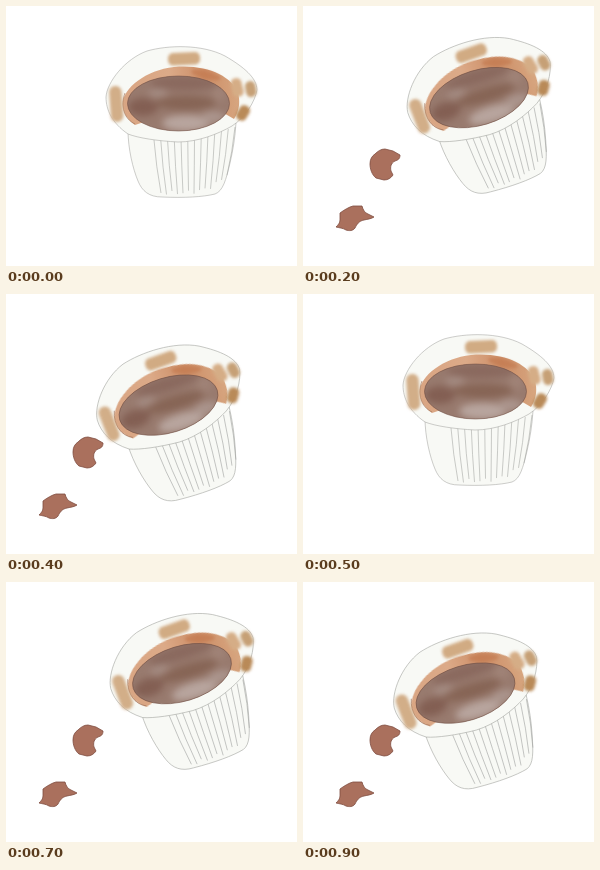
Animation of 291x260 px, one loop 1000 ms. Source, as an HTML page:

```html
<!DOCTYPE html>
<html lang="en">
<head>
<meta charset="utf-8">
<title>Coffee cup</title>
<style>
  html, body { margin: 0; width: 100%; height: 100%; overflow: hidden; background: #fff; }
  svg { display: block; width: 100vw; height: 100vh; }
  .upright, .tilted, .lifted, .crumbs { animation: 500ms step-end infinite; }
  .upright { animation-name: upright; }
  .tilted { animation-name: tilted; }
  .lifted { animation-name: lifted; }
  .crumbs { animation-name: spill; }
  @keyframes upright {
    0%, 60% { visibility: visible; }
    20%, 80%, 100% { visibility: hidden; }
  }
  @keyframes tilted {
    0%, 40%, 60% { visibility: hidden; }
    20%, 80%, 100% { visibility: visible; }
  }
  @keyframes lifted {
    0%, 60%, 100% { visibility: hidden; }
    40% { visibility: visible; }
  }
  @keyframes spill {
    0% { visibility: hidden; }
    40%, 100% { visibility: visible; }
  }
  .paper { fill: #f8f9f5; stroke: #a3a4a0; stroke-width: .55; }
  .ribs { fill: none; stroke: #a0a19f; stroke-width: .55; }
  .crumbs path { fill: #aa705d; stroke: #7f4d40; stroke-width: .8; stroke-linejoin: round; }
  filter { color-interpolation-filters: sRGB; }
</style>
</head>
<body>
<svg viewBox="0 0 291 260" preserveAspectRatio="none">
  <defs>
    <filter id="soft" x="-30%" y="-30%" width="160%" height="160%"><feGaussianBlur stdDeviation="1.4"/></filter>
    <filter id="edge" x="-10%" y="-10%" width="120%" height="120%"><feGaussianBlur stdDeviation=".7"/></filter>
    <filter id="cloud" x="-60%" y="-60%" width="220%" height="220%"><feGaussianBlur stdDeviation="3.5"/></filter>
    <linearGradient id="ring" x1="0" x2="1">
      <stop offset="0" stop-color="#d9a583"/>
      <stop offset=".4" stop-color="#dcaa88"/>
      <stop offset=".7" stop-color="#cc8d66"/>
      <stop offset="1" stop-color="#d7a680"/>
    </linearGradient>
    <clipPath id="pool"><ellipse cx="172.5" cy="97.5" rx="51" ry="27.5"/></clipPath>

    <g id="cup">
      <path class="paper" d="M122 124 C122 143 127 163 132 175 C136 185 143 191 156 191 C178 192 197 191 209 188 C217 185 220 174 224 157 C227 144 229 132 230 117Z"/>
      <path class="ribs" id="ribs"/>
      <path class="paper" d="M100 91 C101 76 119 53 141 45 C162 39 196 38 219 50 C238 61 251 72 251 84 C249 95 240 111 226 120 C212 128 192 136 172 136 C152 135 132 132 122 128 C106 117 100 104 100 91Z"/>

      <path filter="url(#edge)" fill="url(#ring)" d="M116.500 98 C117 82 140 64 168 61 C200 58 226 70 232 87 C235 98 232 107 228 113 L216 106 L150 112 L129 119 C121 113 117 107 116.500 98Z"/>
      <ellipse cx="200" cy="69" rx="15" ry="4" fill="#c3784d" opacity=".65" transform="rotate(14 200 69)" filter="url(#soft)"/>
      <path fill="none" stroke="#9a6a50" stroke-width=".6" d="M119 87 C114 100 118 113 129 118"/>
      <g clip-path="url(#pool)">
        <rect x="118" y="66" width="110" height="62" fill="#987a6e"/>
        <g filter="url(#cloud)">
          <ellipse cx="178" cy="77" rx="34" ry="7" fill="#8a695e"/>
          <ellipse cx="137" cy="101" rx="15" ry="9" fill="#835f53"/>
          <ellipse cx="180" cy="97" rx="30" ry="7" fill="#82604f" opacity=".8"/>
          <ellipse cx="152" cy="87" rx="10" ry="4" fill="#a58d84"/>
          <ellipse cx="213" cy="88" rx="7" ry="8" fill="#a08377"/>
          <ellipse cx="180" cy="117" rx="24" ry="8" fill="#b8a59e"/>
          <ellipse cx="207" cy="111" rx="12" ry="6" fill="#ab958d"/>
        </g>
      </g>
      <ellipse cx="172.500" cy="97.500" rx="51" ry="27.500" fill="none" stroke="#704d42" stroke-width=".55"/>

      <g filter="url(#soft)">
        <rect x="162" y="46.500" width="32" height="12.500" rx="5" fill="#d1ab83" transform="rotate(-3 178 52)"/>
        <rect x="104" y="80" width="12.500" height="36" rx="6" fill="#d2ae88" transform="rotate(-4 110 98)"/>
        <rect x="225.500" y="72" width="11" height="19" rx="5" fill="#d5ad86" transform="rotate(-14 231 81)"/>
        <rect x="239.500" y="75" width="10.500" height="16" rx="5" fill="#c6a076" transform="rotate(-10 245 83)"/>
        <rect x="231.500" y="99" width="11" height="16" rx="5" fill="#b98a58" transform="rotate(32 237 107)"/>
      </g>
    </g>
  </defs>

  <g class="crumbs">
    <path d="M67 158 C67 153 69 150 72 148 C75 145 78 143 82 143 L90 145 L97 149 C97 153 95 154 92 155 C88 157 87 161 88 165 L90 169 C88 172 85 174 81 174 L73 172 C69 169 67 163 67 158Z"/>
    <path d="M33 221 C35 219 37 217 37 214 L37 207 C41 204 46 201 50 200 L59 200 C60 204 62 207 65 208 L71 211 C68 213 65 213 61 214 C56 215 54 218 52 222 C50 225 46 225 43 224 C40 222 37 222 33 221Z"/>
  </g>

  <use class="upright" href="#cup"/>
  <use class="tilted" href="#cup" transform="translate(102 127) rotate(-17) translate(-110 -95)"/>
  <use class="lifted" href="#cup" transform="translate(115.5 107.5) rotate(-17) translate(-110 -95)"/>
</svg>
<script>
  // Pleats lean inward towards the base.
  const count = 13;
  let d = "";
  for (let i = 0; i < count; i++) {
    const t = i / (count - 1);
    const top = 148 + 81 * t, base = 155 + 66 * t;
    const y = 134 - 13 * t * t;
    const end = 187 + 2 * Math.sin(i * 2.3) - 19 * t ** 4;
    const bend = top + (base - top) * .3;
    d += `M${top} ${y}Q${bend} ${(y + end) / 2} ${base} ${end}`;
  }
  document.getElementById("ribs").setAttribute("d", d);
</script>
</body>
</html>
```
